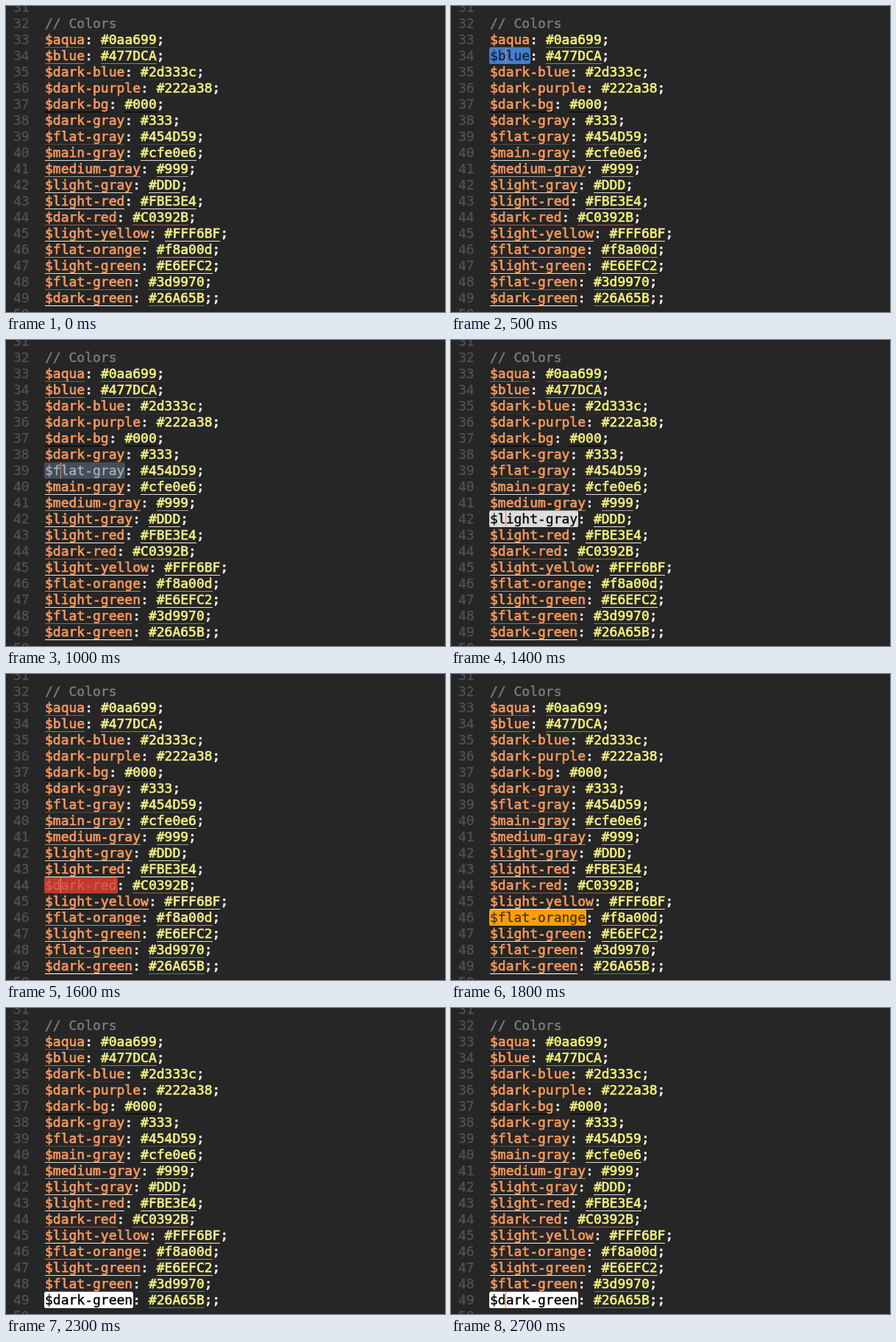
Recreate the animation shown at these times as an HTML page. Size 597 by 417 pixels, loop 2.8 s.

```html
<!DOCTYPE html>
<html lang="en">
<head>
<meta charset="utf-8">
<title>Colour variables</title>
<style>
  html, body { margin: 0; width: 100%; height: 100%; overflow: hidden; background: #262626; }
  #editor {
    position: relative; width: 597px; height: 417px; overflow: hidden;
    font: 18px/22px "DejaVu Sans Mono", monospace; color: #fff;
    -webkit-text-stroke: 0.7px;
  }
  .row { position: absolute; left: 53px; height: 22px; white-space: pre; isolation: isolate; }
  .num { position: absolute; left: -43px; color: #505050; -webkit-text-stroke-width: 0.4px; }
  .comment { color: #7a7a7a; -webkit-text-stroke-width: 0.5px; }
  .name, .value {
    position: relative; display: inline-block; height: 22px; vertical-align: top;
    background: linear-gradient(var(--line), var(--line)) 0 21px / 100% 1px no-repeat;
  }
  .name { color: #f5985f; }
  .value { color: #f1ee82; }
  .on .name { color: var(--ink); background: none; -webkit-text-stroke-width: 0.4px; }
  .on .name::before {
    content: ""; position: absolute; z-index: -1; inset: 0 -1px;
    border-radius: 2px; background: var(--fill);
  }
  #caret { position: absolute; left: 74px; width: 1px; height: 22px; background: #f5814f; }
</style>
</head>
<body>
<div id="editor"></div>
<script>
const LOOP = 2800, STEP = 100, PITCH = 22, FIRST = 33, LAST = 49;
const vars = `aqua #0aa699
blue #477DCA
dark-blue #2d333c
dark-purple #222a38
dark-bg #000
dark-gray #333
flat-gray #454D59
main-gray #cfe0e6
medium-gray #999
light-gray #DDD
light-red #FBE3E4
dark-red #C0392B
light-yellow #FFF6BF
flat-orange #f8a00d
light-green #E6EFC2
flat-green #3d9970
dark-green #26A65B`.split("\n").map(s => s.split(" "));

const editor = document.getElementById("editor");
const rows = {};
const rowTop = n => (n - 32) * PITCH + 13 + "px";

function add(parent, cls, text) {
  const el = document.createElement("span");
  el.className = cls;
  el.textContent = text;
  return parent.appendChild(el);
}

function addRow(n) {
  const row = add(editor, "row", "");
  row.style.top = rowTop(n);
  add(row, "num", n);
  return rows[n] = row;
}

function toHsl(hex) {
  const h = hex.length === 4 ? hex.replace(/\w/g, "$&$&") : hex;
  const [r, g, b] = [1, 3, 5].map(i => parseInt(h.slice(i, i + 2), 16) / 255);
  const max = Math.max(r, g, b), min = Math.min(r, g, b), d = max - min;
  const l = (max + min) / 2;
  const s = d ? d / (1 - Math.abs(2 * l - 1)) : 0;
  const hue = !d ? 0 : max === r ? (g - b) / d : max === g ? 2 + (b - r) / d : 4 + (r - g) / d;
  return [hue * 60, s, l];
}

const hsl = (h, s, l) => `hsl(${h} ${s * 100}% ${l * 100}%)`;

// Muted underline, full fill, and ink that stands out from the fill.
function paint(el, hex) {
  const [h, s, l] = toHsl(hex);
  const ink = l < 0.5 ? Math.max(1 - l, 0.58) : 0.36 * (1 - l);
  el.style.setProperty("--line", hsl(h, s * 0.45, l));
  el.style.setProperty("--fill", hex);
  el.style.setProperty("--ink", hsl(h, s, ink));
}

addRow(31);
add(addRow(32), "comment", "// Colors");
vars.forEach(([name, value], i) => {
  const n = FIRST + i, row = addRow(n);
  paint(add(row, "name", "$" + name), n === LAST ? "#fff" : value);
  add(row, "", ": ");
  paint(add(row, "value", value), value);
  add(row, "", n === LAST ? ";;" : ";");
});
addRow(50);

const caret = add(editor, "", "");
caret.id = "caret";

// One line down per step, with a short pause on line 39.
function activeLine(k) {
  if (k === 1) return LAST;
  if (k < 4) return 0;
  if (k < 11) return 29 + k;
  return Math.min(28 + k, LAST);
}

function caretAlpha(k) {
  if (k === 22 || k === 26) return 0.5;
  return k > 22 && k < 26 ? 0 : 1;
}

let current = 0;
const start = performance.now();
function draw() {
  const k = Math.floor((performance.now() - start) % LOOP / STEP);
  const line = activeLine(k);
  if (line !== current) {
    rows[current]?.classList.remove("on");
    rows[line]?.classList.add("on");
    current = line;
  }
  caret.style.top = rowTop(line);
  caret.style.opacity = line ? caretAlpha(k) : 0;
  requestAnimationFrame(draw);
}
draw();
</script>
</body>
</html>
```
